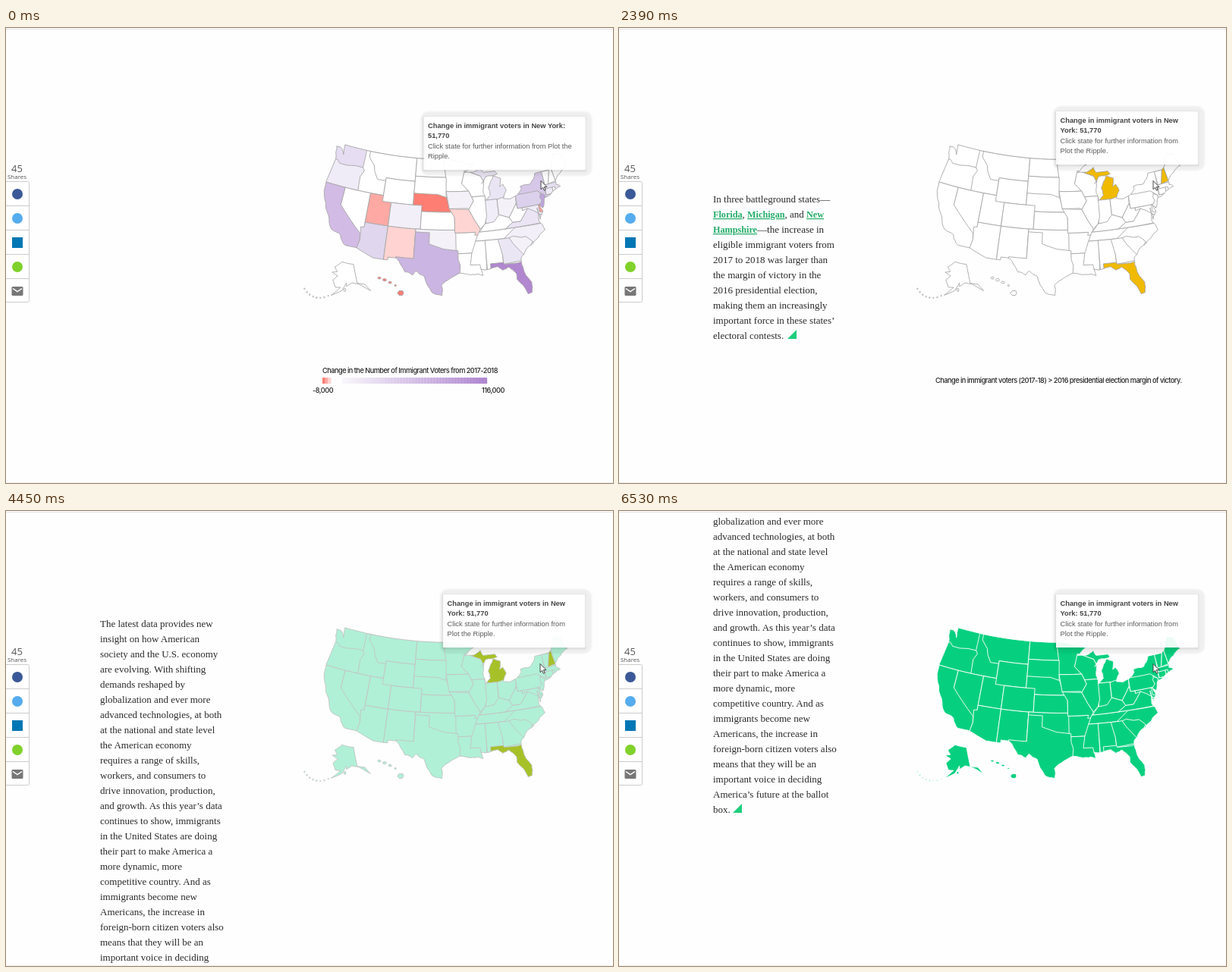
Recreate the animation shown at these times as an HTML page. Size 800 px wide and 600 px high, loop 7210 ms.

```html
<!DOCTYPE html>
<html lang="en">
<head>
<meta charset="utf-8">
<title>Immigrant voters</title>
<style>
html, body { margin: 0; width: 100%; height: 100%; overflow: hidden; background: #fefefe; }
svg { display: block; width: 800px; height: 600px; }
.head { font: 600 15.7px Inter, sans-serif; fill: #111; }
.body { font: 13px "Liberation Serif", Tinos, serif; fill: #2a2a2a; }
.link { font-size: 12.2px; font-weight: bold; fill: #22ad68; text-decoration: underline #7fd3a8; }
.note { font: 500 9.2px Inter, sans-serif; letter-spacing: -.51px; fill: #222; }
.tip { font: 9.3px "Liberation Sans", Arial, sans-serif; fill: #5a5a5a; }
.tip .b { font-weight: bold; fill: #444; }
.share { font-family: "Open Sans", "DejaVu Sans", sans-serif; fill: #555; text-anchor: middle; }
</style>
</head>
<body>
<svg viewBox="0 0 800 600">
  <defs>
    <clipPath id="page"><rect y="2" width="800" height="597"/></clipPath>
    <clipPath id="land"><path id="shape"/></clipPath>
    <filter id="soft" x="-10%" y="-20%" width="120%" height="140%"><feGaussianBlur stdDeviation="1.2"/></filter>
  </defs>
  <rect width="800" height="600" fill="#fefefe"/>
  <g id="map" stroke-width=".9" stroke-linejoin="round">
    <g id="inland" clip-path="url(#land)"></g>
    <path id="coast" fill="none"/>
    <g id="isles"></g>
  </g>
  <g id="legend" class="note">
    <text x="417" y="455">Change in the Number of Immigrant Voters from 2017-2018</text>
    <g id="scale"></g>
    <text x="404" y="481">-8,000</text>
    <text x="627" y="481">116,000</text>
  </g>
  <text id="caption" class="note" x="417" y="468">Change in immigrant voters (2017-18) &gt; 2016 presidential election margin of victory.</text>
  <g clip-path="url(#page)"><g id="story"></g></g>
  <g id="tips" class="tip"></g>
  <path id="cursor" d="M0 0V11.2L2.6 8.8L4.4 12.8L6.2 12L4.4 8.1H8Z" fill="#fff" stroke="#333" stroke-width=".9"/>
  <g id="bar">
    <text class="share" x="14.5" y="189.5" font-size="13">45</text>
    <text class="share" x="14.5" y="199" font-size="8">Shares</text>
    <path d="M0 202.5H28.5Q30.5 202.5 30.5 204.5V359.5Q30.5 361.5 28.5 361.5H0M0 234.5H30M0 266.5H30M0 298.5H30M0 330.5H30" fill="#fff" stroke="#ccc"/>
    <circle cx="15" cy="219" r="7" fill="#3b5998"/>
    <circle cx="15" cy="251" r="7" fill="#55acee"/>
    <rect x="8" y="276" width="14" height="14" fill="#0077b5"/>
    <circle cx="15" cy="315" r="7" fill="#80d12b"/>
    <rect x="7.5" y="341" width="15" height="12" rx="1.5" fill="#777"/>
    <path d="M9 343.5L15 347.5L21 343.5" fill="none" stroke="#fff" stroke-width="1.5"/>
  </g>
  <path d="M0 1.5H800" stroke="#e2e2e2"/>
  <path d="M0 599.5H800" stroke="#eee"/>
</svg>
<script>
const NS = "http://www.w3.org/2000/svg";
const $ = id => document.getElementById(id);

function add(parent, tag, attrs = {}, html = "") {
  const node = document.createElementNS(NS, tag);
  for (const k in attrs) node.setAttribute(k, attrs[k]);
  node.innerHTML = html;
  return parent.appendChild(node);
}

const rgb = hex => [1, 3, 5].map(i => parseInt(hex.slice(i, i + 2), 16));
function mix(a, b, t) {
  const p = rgb(a), q = rgb(b);
  return `rgb(${p.map((v, i) => Math.round(v + (q[i] - v) * t))})`;
}

let seed = 7;
const random = () => (seed = seed * 16807 % 2147483647) / 2147483647;

// Albers equal-area conic; longitudes are degrees west.
function albers(p1, p2, axis, [lon0, lat0], size, [tx, ty]) {
  const rad = Math.PI / 180;
  const s1 = Math.sin(p1 * rad);
  const n = (s1 + Math.sin(p2 * rad)) / 2;
  const c = 1 - s1 * s1 + 2 * n * s1;
  const raw = ([lon, lat]) => {
    const r = Math.sqrt(c - 2 * n * Math.sin(lat * rad)) / n;
    const a = n * (axis - lon) * rad;
    return [r * Math.sin(a), r * Math.cos(a)];
  };
  const [cx, cy] = raw([lon0, lat0]);
  return point => {
    const [x, y] = raw(point);
    return [tx + (x - cx) * size, ty + (y - cy) * size];
  };
}

const lower48 = albers(29.5, 45.5, 96, [96, 38], 444, [582.9, 258.7]);
const alaska = albers(55, 65, 154, [156, 58.5], 156, [442.6, 343]);
const hawaii = albers(8, 18, 157, [160, 19.9], 444, [487.5, 347.2]);

const parse = text => text.split(",").map(p => p.trim().split(" ").map(Number));

// Fractal coast; long edges and parallels are surveyed, so they stay straight.
function roughen(a, b, depth = 2) {
  const dx = b[0] - a[0], dy = b[1] - a[1], len = Math.hypot(dx, dy);
  if (!depth || len > 3.5 || len < .25 || !dy) return [a];
  const k = (random() - .5) * .2;
  const mid = [a[0] + dx / 2 - dy * k, a[1] + dy / 2 + dx * k];
  return [...roughen(a, mid, depth - 1), ...roughen(mid, b, depth - 1)];
}
const coastline = pts => pts.flatMap((p, i) => roughen(p, pts[(i + 1) % pts.length]));

// Long edges are subdivided so that parallels curve.
function ring(pts, project) {
  const out = pts.flatMap((a, i) => {
    const b = pts[(i + 1) % pts.length];
    const steps = Math.ceil(Math.hypot(b[0] - a[0], b[1] - a[1]) / 2);
    return Array.from({ length: steps }, (_, k) =>
      project(a.map((v, j) => v + (b[j] - v) * k / steps)).map(v => v.toFixed(1)).join(" "));
  });
  return "M" + out.join("L") + "Z";
}

const north = "124.7 48.4,123.1 48.1,122.5 47.3,122.8 49,95.2 49,93 48.6,89.6 48,92 46.7,89 46.9,88 47.4,87.4 46.5,84.5 46.5,84 46,87 45.7,88 44.6,87.4 45.1,87.8 43,87.4 41.7,86.2 42.5,86.5 43.8,85.1 45.7,83.4 45.2,83.8 43.8,83 44.1,82.4 43,83.3 41.7,81.7 41.5,78.9 42.8,79 43.3,76.5 43.4,75 45,71.5 45,70.9 45.3,69.2 47.4,67.8 47,67 44.8";
const atlantic = "69 44,70.7 43,70.8 42.3,69.9 41.8,71.2 41.5,74 40.6,74.9 39,75.5 39.5,75.1 38.4,76 37.2,76.2 39.2,76.4 37,75.5 35.3,77.9 33.9,79.2 33.2,81.3 31.5,81.3 29.8,80.1 27,80.3 25.3";
const gulf = "81.1 25.1,82.8 27.9,82.7 28.8,84 30.1,85.3 29.7,86.3 30.4,89.5 30.2,89.2 29.1,91.2 29.4,93.8 29.7,95.5 28.9,97.3 27.6,97.2 25.9";
const south = "99.1 26.4,100.7 29.1,102.3 29.9,102.9 29.2,104.5 29.6,106.5 31.8,108.2 31.8,108.2 31.3,111.1 31.3,114.8 32.5";
const pacific = "117.1 32.5,118.5 34,120.6 34.6,121.9 36.6,123.8 39.2,124.4 40.4,124.5 42.8,124 46.3";
const outline = ring(coastline([north, atlantic, gulf, south, pacific].flatMap(parse)), lower48);
$("shape").setAttribute("d", outline);
$("coast").setAttribute("d", outline);

// States overlap: later ones cover earlier ones, and the coast trims the rest.
const states = [];
function paint(tint, pts, key = false, parent = $("inland"), project = lower48) {
  states.push({ tint, key, node: add(parent, "path", { d: ring(pts, project) }) });
}
const state = (tint, text, key) => paint(tint, parse(text), key);
const box = (tint, w, e, s, n) => paint(tint, [[w, n], [e, n], [e, s], [w, s]]);

const none = "#ffffff", faint = "#f4f1f9", pale = "#efebf7", mild = "#e5dff1", red = "#ff7e74";

box(none, 130, 60, 24, 50);
// West
box(none, 117.3, 111, 42, 49);
box("#e6ddf2", 126, 117, 45.6, 50);
state(pale, "126 46.3,123.5 46.2,122.8 45.7,121 45.7,119 46,117 46,116.5 45.5,117.2 44.4,117 42,126 42");
state(none, "116 49,104 49,104 45,111 45,111 44.5,113 44.5,114 45.7,114.4 46.7,116 48");
box(none, 120, 114, 35, 42);
box("#ffa9a4", 114, 109, 37, 42);
box(none, 111, 104, 41, 45);
state("#e0d6ee", "114 37,109 37,109 31,115 31,114.8 32.5,114.4 34,114.7 36.1,114 36.2");
state("#d2bbe5", "126 42,120 42,120 39,114.6 35,114.4 34,114.8 32,126 32");
box("#ffd3d1", 109, 103, 31, 37);
// Plains
state(none, "97.2 50,89 50,89 47.5,92 46.7,92.8 44.8,91.2 43.5,97.2 43.5");
state(none, "104 49,97.2 49,96.6 45.9,104 45.9");
box(none, 104, 96.5, 42.5, 45.9);
state(red, "104 43,98.5 43,96.4 42.5,95.3 40,104 40");
box("#f2eff8", 109, 102, 37, 41);
box(none, 102, 94.6, 37, 40);
box(none, 94.6, 89.7, 33, 36.5);
box(none, 94.1, 88.8, 28.8, 33);
box(faint, 103, 94.4, 33.5, 37);
state("#cbb5e2", "103 36.5,100 36.5,100 34.6,97 33.8,94 33.5,94 32,93.6 31,93.8 29,97 25,107 29,106.6 32,103 32");
// Lakes
state(none, "92 47,90.4 46.6,88.1 45.9,87.6 45.1,87 44,87 42.5,90.6 42.5,91.2 43.5,92.8 44.8");
state("#eae5f4", "90.4 46.6,90 48,84 47,82 43,83.3 41.7,87.2 41.75,87 44,87.1 45.3,87.6 45.1,88.1 45.9", true);
box("#f1edf8", 87.8, 84.8, 37.8, 41.75);
state(none, "90.6 42.5,87.5 42.5,87.5 39,88 37.8,89.1 37,90.2 38.5,91.4 40.4,90.2 41.8");
state(faint, "96.5 43.5,91.2 43.5,90.2 41.8,91.4 40.4,91.7 40.6,95.8 40.6");
state("#ffd5d3", "95.8 40.6,91.4 40.4,90.2 38.5,89.1 37,89.7 36,90.4 36,90.2 36.5,94.6 36.5,94.6 39.1");
state(faint, "84.8 41.7,83 42,80.5 42,80.6 40.6,82.6 38.4,84.8 39.1");
// South
state(none, "89.5 36.5,81.7 36.6,81.7 35,90.3 35");
state(none, "89.3 36.5,88 37.8,86 38,84.8 39.1,82.6 38.4,82 37.5,83.7 36.6");
state(none, "91.2 33,90.3 35,88.2 35,88.4 30,89.5 30,89.7 31,91.6 31");
box(none, 88.3, 85, 30, 35);
state("#f2eff8", "84.3 35,78 33.5,75 35,75 36.5,81.7 36.6");
state("#ebe6f4", "85.6 35,83.1 35,80 31,85 30.7,85 32.3");
state(faint, "83.2 35,82.3 35.2,80.8 34.8,79.7 34.8,78.5 33.8,80.5 31.5,82.6 34");
state("#b187d0", "87.6 31,85 31,84.9 30.7,82.2 30.6,79 31,79 24,84 24,87.6 30", true);
// Northeast
box(pale, 79.5, 75, 38, 39.7);
state("#eae4f4", "83.7 36.6,82 37.5,80.3 37.5,78.3 39.4,77 38.8,75 37.5,75 36.6");
state(none, "82.6 38.4,82 37.5,80.3 37.5,78.3 39.4,79.5 39.2,79.5 39.7,80.5 39.7,80.6 40.6");
box("#ff9a92", 75.8, 75, 38.4, 39.8);
box("#dcd1ec", 80.5, 74.8, 39.7, 42.3);
state("#d6c7e8", "79.8 43,79.8 42,75.4 42,73.9 41,74 40,71 41,73.6 41,73.3 45,75 45.3,80 44");
state("#bfa4dd", "74.7 41.4,73.9 41,74 38.5,75.6 39.5,74.8 40.2,75.1 40.9");
box(mild, 73.4, 69, 41, 42.7);
box(pale, 73.5, 71.8, 41, 42);
box(none, 71.8, 71.2, 41, 42);
state(none, "73.4 45,71.5 45,72.5 42.7,73.3 42.7");
state(none, "71 45.4,70 48,66 47,66 44,70.7 42.9");
state(none, "71.5 45.1,71 45.3,70.7 42.9,72.5 42.7", true);

// Alaska and the islands
const far = (tint, pts, project) => paint(tint, pts, false, $("isles"), project);
function island(tint, lon, lat, r, project) {
  const pts = Array.from({ length: 6 }, (_, i) => {
    const a = i * Math.PI / 3, d = r * (.8 + random() * .4);
    return [lon - d * Math.cos(a), lat + d * .7 * Math.sin(a)];
  });
  far(tint, pts, project);
}
far(none, coastline(parse("141 69.6,156.6 71.3,166 68.4,162 66.3,168 65.6,161 64.3,165.5 62,162 58.7,157.3 58.8,164.8 54.6,156 57.3,151.5 61,151.7 59.3,146 60.8,140 59.8,136 58,131 55,134 58.8,141 60.3")), alaska);
for (let lon = 167; lon < 189; lon += 2.9) island(none, lon, 51.6 + .02 * (lon - 178) ** 2, .45, alaska);
island(none, 153.4, 57.6, 1, alaska);
[.58, .18, .3, .34, .3].forEach((r, i) => island(red, 155.5 + i * .98, 19.6 + Math.sqrt(i) * 1.3, r, hawaii));

// Legend swatches
function swatch(x, width, fill) {
  add($("scale"), "rect", { x, y: 461, width, height: 8, fill });
}
[red, "#ffa9a4", "#ffd3d1"].forEach((c, i) => swatch(417 + i * 3.8, 3.8, c));
for (let i = 0; i < 48; i++) swatch(443 + i * 3.98, 4.1, mix("#f8f6fb", "#ae85cf", i / 47));

// Scrolling column
function lines(parent, cls, y, gap, text) {
  text.split("\n").forEach((s, i) => add(parent, "text", { class: cls, x: 124, y: y + i * gap }, s));
}
function step(y, text, endX) {
  const g = add($("story"), "g");
  lines(g, "body", y, 20, text);
  const base = y + 20 * (text.split("\n").length - 1);
  add(g, "path", { d: `M${endX} ${base}h12v-12z`, fill: "#1fce7c" });
  return g;
}
const link = s => `<tspan class="link">${s}</tspan>`;

const steps = [
  step(182, `Between 2017 and 2018, the
number of immigrants eligible
to vote rose by more than
700,000 people to a total of
21.4 million nationwide.
These eligible immigrant
voters made up 9.5 percent of
the U.S. electorate in 2018.`, 271),
  step(630, `In three battleground states—
${link("Florida")}, ${link("Michigan")}, and ${link("New")}
${link("Hampshire")}—the increase in
eligible immigrant voters from
2017 to 2018 was larger than
the margin of victory in the
2016 presidential election,
making them an increasingly
important force in these states’
electoral contests.`, 222),
  step(1118, `The latest data provides new
insight on how American
society and the U.S. economy
are evolving. With shifting
demands reshaped by
globalization and ever more
advanced technologies, at both
at the national and state level
the American economy
requires a range of skills,
workers, and consumers to
drive innovation, production,
and growth. As this year’s data
continues to show, immigrants
in the United States are doing
their part to make America a
more dynamic, more
competitive country. And as
immigrants become new
Americans, the increase in
foreign-born citizen voters also
means that they will be an
important voice in deciding
America’s future at the ballot
box.`, 150)
];
lines(steps[0], "head", 81, 24, "Immigrants also have\ngrowing electoral\npower at the ballot\nbox.");

// Tooltip in its two widths
function tooltip(x, y, width, bold, plain) {
  const g = add($("tips"), "g");
  const halo = { fill: "none", stroke: "#000", filter: "url(#soft)" };
  add(g, "rect", { ...halo, x, y: y - 3, width: width + 5, height: 77, rx: 6, "stroke-width": 8, opacity: .055 });
  add(g, "rect", { ...halo, x, y: y + 1, width, height: 70, "stroke-width": 2, opacity: .12 });
  add(g, "rect", { x, y, width, height: 70, fill: "#fff", opacity: .92 });
  [...bold, ...plain].forEach((s, i) =>
    add(g, "text", { x: x + 5.5, y: y + 15 + i * 13.3, class: i < bold.length ? "b" : "" }, s));
  return g;
}
const wide = tooltip(550.5, 117, 213, ["Change in immigrant voters in New York:", "51,770"],
  ["Click state for further information from Plot the", "Ripple."]);
const narrow = tooltip(576, 110, 187, ["Change in immigrant voters in New", "York: 51,770"],
  ["Click state for further information from", "Plot the Ripple."]);

// [start ms, scroll]
const timeline = [
  [0, -600], [330, -334], [1010, -133], [1360, 0], [2040, 266], [2390, 400], [3070, 533],
  [3420, 707], [4110, 840], [4450, 965], [5140, 1192], [5490, 1200], [6180, 1200], [6530, 1200]
];
const LOOP = 7210, GREEN = "#06d07f", GOLD = "#f0ba00";
const show = (node, on) => node.setAttribute("display", on ? "inline" : "none");
let last = null;

function draw(ms) {
  const now = timeline.filter(k => k[0] <= ms).pop();
  if (now === last) return;
  last = now;
  const [start, scroll] = now;
  const active = [-200, 200, 800].filter(y => scroll > y).length - 1;
  const green = active < 2 ? 0 : Math.min(1, (start - 3480) / 3050);

  $("story").setAttribute("transform", `translate(0 ${-scroll})`);
  steps.forEach((g, i) => g.setAttribute("opacity", i <= active ? 1 : .23));
  $("map").setAttribute("stroke", mix("#a8a8a8", "#ffffff", green));
  for (const s of states) {
    const fill = active < 1 ? s.tint : mix(s.key ? GOLD : none, GREEN, green);
    s.node.setAttribute("fill", fill);
  }
  show($("legend"), active < 1);
  show($("caption"), active === 1);
  show(wide, start < 1010);
  show(narrow, start >= 1010);
  $("cursor").setAttribute("transform", `translate(${start < 1360 ? 705 : 704} 201.5)`);
}

const t0 = performance.now();
function tick() {
  draw((performance.now() - t0) % LOOP);
  requestAnimationFrame(tick);
}
tick();
</script>
</body>
</html>
```
